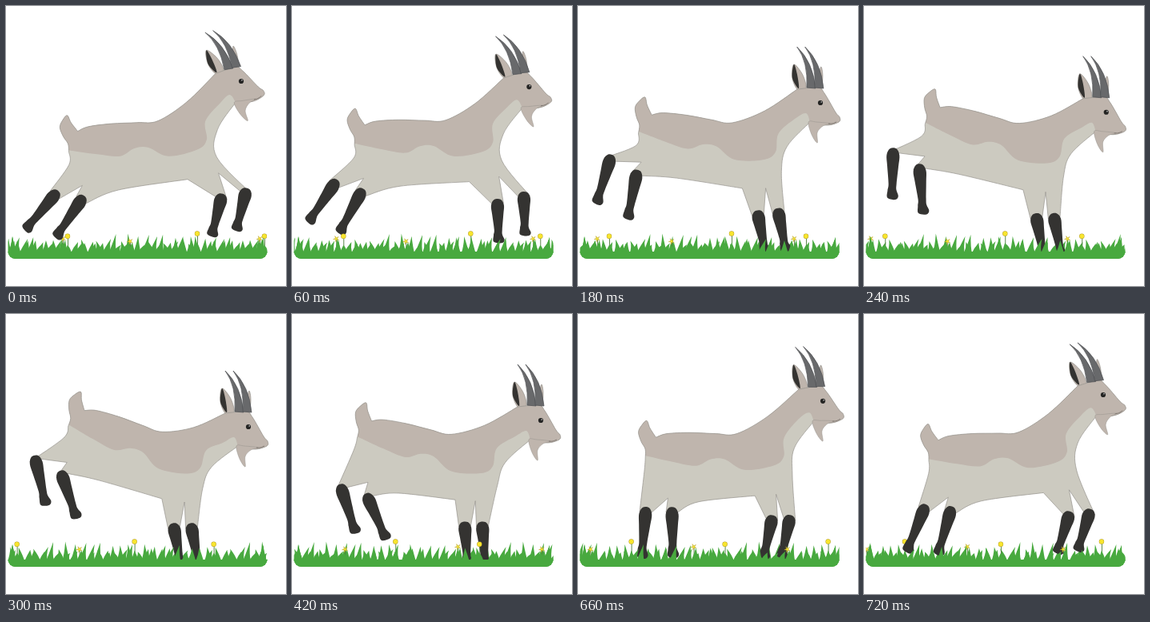
An HTML page with a canvas for the animation above (0.78 s loop, 350 by 350 pixels).

```html
<!DOCTYPE html>
<html lang="en">
<head>
<meta charset="utf-8">
<title>Running goat</title>
<style>
html, body { margin: 0; width: 100%; height: 100%; overflow: hidden; background: #fff; }
canvas { display: block; width: 350px; height: 350px; }
</style>
</head>
<body>
<canvas id="stage" width="350" height="350"></canvas>
<script>
const ctx = document.getElementById('stage').getContext('2d');
const STEP_MS = 60, STEPS = 13;
const POSE_STEPS = [0, 2, 3, 5, 7, 9, 12];
const RAD = Math.PI / 180;
const COLORS = {
  coat: '#cccac0', back: '#bfb5ad', line: '#96938d', dark: '#343331',
  horn: '#68696b', grass: '#48a93f', petal: '#f8e52e', rim: '#b5a02c'
};

// Smooth periodic motion of one value through the key poses.
function track(...values) {
  const n = values.length;
  const value = i => values[(i + n) % n];
  const time = i => POSE_STEPS[(i + n) % n] + STEPS * Math.floor(i / n);
  const slope = i => (value(i + 1) - value(i - 1)) / (time(i + 1) - time(i - 1));
  return step => {
    const i = POSE_STEPS.findLastIndex(t => t <= step);
    const span = time(i + 1) - time(i), u = (step - time(i)) / span, v = 1 - u;
    return v * v * ((1 + 2 * u) * value(i) + u * span * slope(i)) +
      u * u * ((1 + 2 * v) * value(i + 1) - v * span * slope(i + 1));
  };
}

// The joints that drive the whole rig; swings are degrees from straight down.
const gait = {
  eyeX: track(294, 300, 303, 303, 311, 318, 299),
  eyeY: track(94, 111, 121, 141, 133, 124, 101),
  hipX: track(83, 85, 84, 89, 91, 97, 86),
  hipY: track(164, 147, 142, 125, 139, 151, 165),
  hindX: track(61, 46, 40, 37, 62, 95, 75),
  hindY: track(236, 208, 192, 183, 219, 248, 244),
  hindSwing: track(-40, -24, -17, 13, 18, 24, -22),
  foreX: track(269, 240, 225, 210, 216, 218, 256),
  foreY: track(240, 256, 261, 267, 265, 263, 252),
  foreSwing: track(-14, 16, 11, 10, 4, 0, -17)
};

// Torso points start at the tail root, head points at the eye.
const TAIL = [[-8,17], [-7,7], [-11,-3], [-13,-15], [-8,-23], [-1,-28], [2,-18], [8,-6]];
const SPINE = [[22,-9], [51,-7], [83,-2], [109,1]];
const SADDLE = [[-8,15], [26,27], [54,35], [73,29], [90,31], [113,47], [150,46], [164,36], [167,13]];
const HEAD = [[-29,-17], [-3,-19], [5,-12], [19,12], [24,18], [23,24], [8,28], [-13,24]];
const BEARD = [[12,26], [3,29], [-4,37], [-4,50], [-11,40], [-15,24], [-5,24]];
const SHIN = [[-.1,-4], [.05,-8], [.3,-7], [.7,-5], [.85,-6], [1.02,-6], [1.06,4],
  [.98,7.5], [.84,5], [.7,5], [.3,7], [.05,8], [-.1,4]];

const mix = (a, b, t) => [a[0] + (b[0] - a[0]) * t, a[1] + (b[1] - a[1]) * t];
const shift = (p, x, y) => [p[0] + x, p[1] + y];
const cycle = (step, peak) => Math.cos(2 * Math.PI * (step - peak) / STEPS);

function frame([ox, oy], angle) {
  const c = Math.cos(angle), s = Math.sin(angle);
  return ([x, y]) => [ox + x * c - y * s, oy + x * s + y * c];
}

function smooth(path, pts, closed = false) {
  const n = pts.length;
  const p = i => closed ? pts[(i + n) % n] : pts[Math.max(0, Math.min(n - 1, i))];
  path.lineTo(...pts[0]);
  for (let i = 0; i < (closed ? n : n - 1); i++) {
    const [a, b, c, d] = [p(i - 1), p(i), p(i + 1), p(i + 2)];
    path.bezierCurveTo(b[0] + (c[0] - a[0]) / 6, b[1] + (c[1] - a[1]) / 6,
      c[0] - (d[0] - b[0]) / 6, c[1] - (d[1] - b[1]) / 6, ...c);
  }
}

function outline(path, width = .7, color = COLORS.line) {
  ctx.strokeStyle = color;
  ctx.lineWidth = width;
  ctx.stroke(path);
}

function blob(pts, fill, edge = 0) {
  const path = new Path2D();
  smooth(path, pts, true);
  ctx.fillStyle = fill;
  ctx.fill(path);
  if (edge) outline(path, edge);
}

function dot([x, y], radius, fill) {
  ctx.beginPath();
  ctx.arc(x, y, radius, 0, Math.PI * 2);
  ctx.fillStyle = fill;
  ctx.fill();
}

function makeLeg(knee, swing, length) {
  const at = frame(knee, -swing * RAD);
  return {
    knee, left: at([-7.5, 0]), right: at([7.5, 0]),
    shin: SHIN.map(([along, across]) => at([across, along * length]))
  };
}

function drawHorn(head, x) {
  const tip = head([x - 21, -70]);
  const horn = new Path2D();
  horn.moveTo(...tip);
  horn.quadraticCurveTo(...head([x - 1, -51]), ...head([x + 2, -18]));
  horn.lineTo(...head([x - 9, -19]));
  horn.quadraticCurveTo(...head([x - 7, -51]), ...tip);
  ctx.fillStyle = COLORS.horn;
  ctx.fill(horn);
  outline(horn, .7, '#505153');
}

function drawGoat(step) {
  const at = {};
  for (const name in gait) at[name] = gait[name](step);
  const hip = [at.hipX, at.hipY], eye = [at.eyeX, at.eyeY];
  const pitch = Math.atan2(eye[1] - hip[1], eye[0] - hip[0]) + 7 * RAD;
  const nod = -14 * RAD * Math.max(0, cycle(step, 0)) ** 2;
  const torso = frame(hip, pitch), head = frame(eye, nod);

  const hindKnee = [at.hindX, at.hindY], foreKnee = [at.foreX, at.foreY];
  const reach = Math.max(0, cycle(step, 1)) ** 2;
  const hindFar = makeLeg(hindKnee, at.hindSwing, 55);
  const hindNear = makeLeg(shift(hindKnee, 33, 10 + 10 * cycle(step, 4)), at.hindSwing + 6, 54);
  const foreNear = makeLeg(foreKnee, at.foreSwing, 47);
  const foreFar = makeLeg(shift(foreKnee, 22 + 11 * reach, -9 * reach), at.foreSwing, 47);
  const fork = (a, b, root) => mix(mix(a.knee, b.knee, .5), torso(root), .34);

  const skull = HEAD.map(head), jaw = skull[skull.length - 1];
  const spine = SPINE.map(torso), withers = spine[spine.length - 1];
  const nape = shift(mix(withers, skull[0], .5), 0, 6);
  const brisket = torso([172, 60]);
  const throat = shift(mix(jaw, brisket, .5), -11, 0);
  const armpit = mix(torso([118, 68]), foreNear.left, .3);
  const flank = mix(hindNear.knee, torso([75, 74]), .6);
  const tail = TAIL.map(torso);

  blob([[-33,-48], [-22,-35], [-18,-18], [-28,-16], [-35,-31]].map(head), COLORS.back, .7);
  blob([[-33,-48], [-29,-36], [-27,-18], [-35,-31]].map(head), COLORS.dark);
  blob([[-4,-18], [-2,-34], [1,-45], [3,-34], [1,-17]].map(head), COLORS.back, .7);

  const body = new Path2D();
  body.moveTo(...tail[0]);
  smooth(body, tail);
  smooth(body, [tail[tail.length - 1], ...spine, nape, skull[0]]);
  smooth(body, skull);
  smooth(body, [jaw, throat, brisket, foreFar.right]);
  body.lineTo(...foreFar.left);
  body.lineTo(...fork(foreNear, foreFar, [145, 20]));
  body.lineTo(...foreNear.right);
  body.lineTo(...foreNear.left);
  smooth(body, [armpit, flank, hindNear.right]);
  body.lineTo(...hindNear.left);
  body.lineTo(...fork(hindFar, hindNear, [40, 40]));
  body.lineTo(...hindFar.right);
  smooth(body, [hindFar.left, torso([-11, 33]), tail[0]]);
  body.closePath();
  ctx.fillStyle = COLORS.coat;
  ctx.fill(body);

  ctx.save();
  ctx.clip(body);
  const saddle = new Path2D();
  saddle.moveTo(...torso([-60, -60]));
  saddle.lineTo(...torso([-60, 13]));
  smooth(saddle, [...SADDLE.map(torso), ...[[-32,20], [-18,13], [-13,25]].map(head)]);
  saddle.lineTo(350, 230);
  saddle.lineTo(350, 0);
  ctx.fillStyle = COLORS.back;
  ctx.fill(saddle);
  ctx.restore();
  outline(body);

  for (const leg of [hindFar, hindNear, foreFar, foreNear]) blob(leg.shin, COLORS.dark);
  blob(BEARD.map(head), COLORS.back, .5);
  drawHorn(head, -8);
  drawHorn(head, 2);

  const mouth = new Path2D();
  smooth(mouth, [[10,26], [15,26], [20,24]].map(head));
  outline(mouth, .8, '#716a65');
  dot(eye, 3.1, '#242423');
  dot(head([1.2, -1]), .8, '#ddd');
}

function seeded(seed) {
  return () => (seed = seed * 16807 % 2147483647) / 2147483647;
}

const TILE = 246, BLADES = 25;
const random = seeded(4127);
const blades = Array.from({ length: BLADES }, (_, i) => ({
  x: (i + random() * .6) * TILE / BLADES,
  top: 285 + 14 * random(),
  lean: 10 * random() - 4
}));

function drawBlade(x, top, lean) {
  ctx.beginPath();
  ctx.moveTo(x - 5, 309);
  ctx.quadraticCurveTo(x - 2, 302, x + lean, top);
  ctx.quadraticCurveTo(x + 3, 302, x + 5, 309);
  ctx.fillStyle = COLORS.grass;
  ctx.fill();
}

function drawStem(x, y) {
  ctx.fillStyle = '#4b7b3b';
  ctx.fillRect(x, y, .9, 20);
}

function drawFlower(x, y) {
  drawStem(x, y);
  dot([x, y], 3.2, COLORS.rim);
  dot([x, y], 2.7, COLORS.petal);
}

function drawStar(x, y) {
  drawStem(x, y);
  ctx.beginPath();
  for (let i = 0; i < 10; i++) {
    const angle = i * Math.PI / 5 + .5, radius = i % 2 ? 1.2 : 3.8;
    ctx.lineTo(x + radius * Math.cos(angle), y + radius * Math.sin(angle));
  }
  ctx.closePath();
  ctx.fillStyle = COLORS.petal;
  ctx.fill();
  ctx.strokeStyle = COLORS.rim;
  ctx.lineWidth = .5;
  ctx.stroke();
}

function drawMeadow(flowerX, flowerY) {
  ctx.save();
  ctx.beginPath();
  ctx.roundRect(2.5, 270, 324, 46, [0, 0, 9, 9]);
  ctx.clip();
  for (let x = flowerX - 2 * TILE; x < 360; x += TILE) {
    drawFlower(x, flowerY);
    drawStar(x + 78, flowerY + 6.5);
    for (const blade of blades) drawBlade(x + blade.x, blade.top + flowerY - 286, blade.lean);
  }
  ctx.fillStyle = COLORS.grass;
  ctx.fillRect(2, 307, 326, 12);
  drawBlade(8, 288, 0);
  drawBlade(319, 289, 3);
  ctx.restore();
}

function draw(step) {
  ctx.fillStyle = '#fff';
  ctx.fillRect(0, 0, 350, 350);
  drawMeadow(239 - 15.67 * step, 284.5);
  drawGoat(step);
  drawMeadow(77 + TILE - 12.67 * step, 287.7);
}

function tick() {
  draw(Math.floor(performance.now() / STEP_MS) % STEPS);
  requestAnimationFrame(tick);
}
tick();
</script>
</body>
</html>
```
